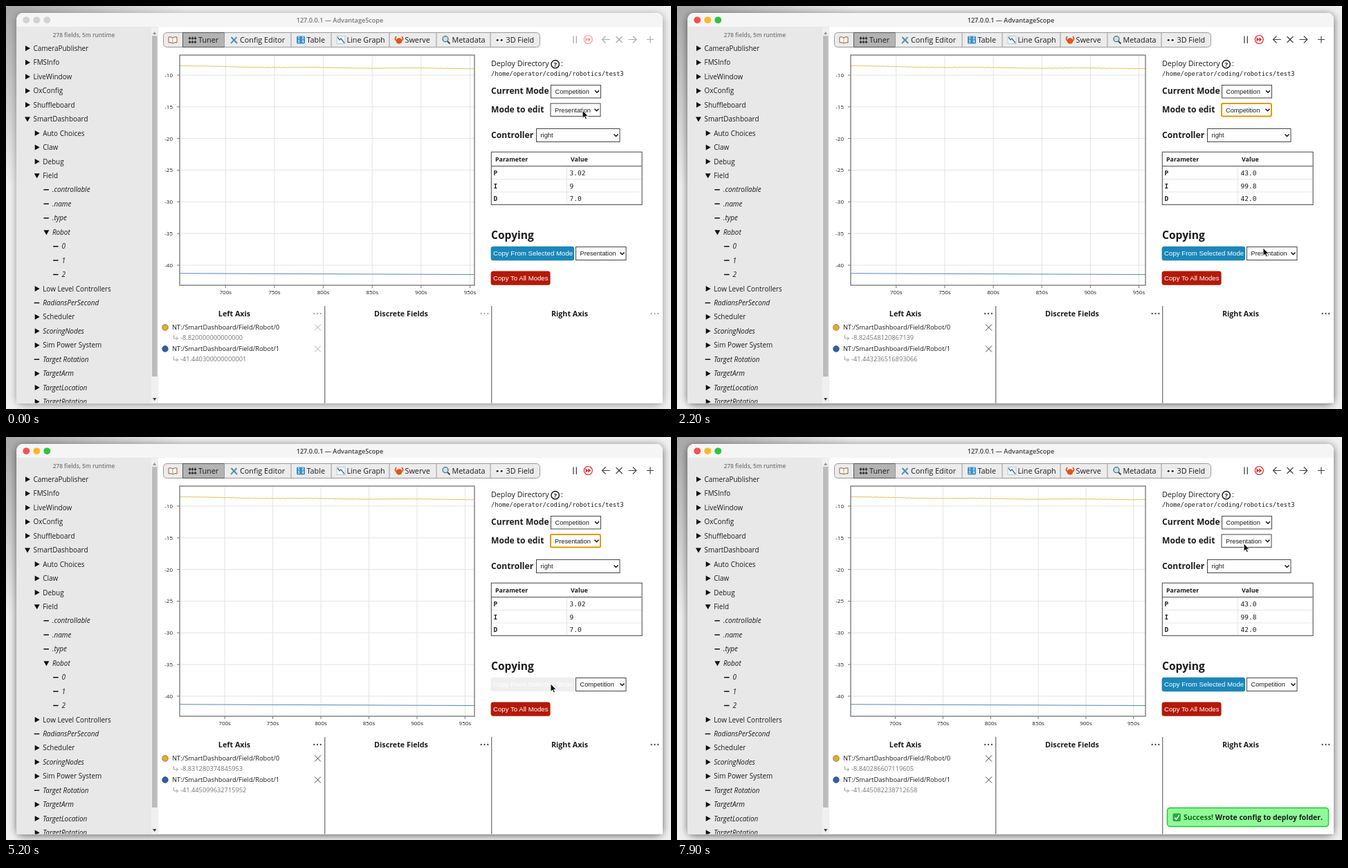
These frames come from a looping animation (961 px wide and 583 px high, 8 s). An HTML page:

```html
<!DOCTYPE html>
<html lang="en">
<head>
<meta charset="utf-8">
<title>Tuner</title>
<style>
html, body { margin: 0; width: 100%; height: 100%; overflow: hidden; background: #efefef; }
svg { display: block; width: 961px; height: 583px; }
text { font-family: "Open Sans", "Noto Sans", sans-serif; fill: #1c1c1c; white-space: pre; }
.mono { font-family: "DejaVu Sans Mono", monospace; }
.ui { font-family: "Liberation Sans", Arial, sans-serif; }
.b { font-weight: 700; }
.sb { font-weight: 600; }
.i { font-style: italic; }
</style>
</head>
<body>
<svg id="stage" viewBox="0 0 961 583" xmlns="http://www.w3.org/2000/svg"></svg>
<script>
const LOOP = 8000, STEP = 100;
const stage = document.getElementById('stage');

// Moments of the story, in ms
const AT = {
  focus: 400, editOpen: 500, editPick: 1300, copyFocus: 2400, copyOpen: 3100, copyPick: 3600,
  editReopen: 3900, editRepick: 4400, copyClick: 5100, ask: 5500, confirm: 6500, written: 6800, toast: 7000
};

// Where the pointer comes to rest
const STOPS = [
  { at: AT.focus, x: 833, y: 151 },
  { at: 1100, x: 828, y: 177 },
  { at: 1500, x: 828, y: 178 },
  { at: 2200, x: 847, y: 350 },
  { at: AT.copyOpen, x: 847, y: 354 },
  { at: AT.copyPick, x: 846, y: 386 },
  { at: AT.editReopen, x: 815, y: 158 },
  { at: 4100, x: 809, y: 174 },
  { at: AT.editRepick, x: 811, y: 164 },
  { at: 4900, x: 787, y: 357 },
  { at: AT.ask, x: 787, y: 357 },
  { at: 6000, x: 616, y: 219 },
  { at: 6200, x: 592, y: 247 },
  { at: 7100, x: 590, y: 249 },
  { at: 7500, x: 841, y: 160 },
  { at: 7900, x: 819, y: 154 }
];

// Markup helpers
const rect = (x, y, w, h, fill, more = '') =>
  `<rect x="${x}" y="${y}" width="${w}" height="${h}" fill="${fill}" ${more}/>`;
const circle = (x, y, r, fill, more = '') => `<circle cx="${x}" cy="${y}" r="${r}" fill="${fill}" ${more}/>`;
const path = (d, more = '') => `<path d="${d}" ${more}/>`;
const stroke = (d, color, width = 1, more = '') =>
  path(d, `fill="none" stroke="${color}" stroke-width="${width}" ${more}`);
const text = (x, y, size, str, cls = '', more = '') =>
  `<text x="${x}" y="${y}" font-size="${size}" class="${cls}" ${more}>${str}</text>`;
const group = (id, body) => `<g id="${id}">${body}</g>`;
const repeat = (n, make) => Array.from({ length: n }, (_, i) => make(i)).join('');
const mid = 'text-anchor="middle"';
const white = 'style="fill:#fff"';

// Sidebar rows: level, marker (> closed, v open, - leaf), label; * means italic
const TREE = `0>CameraPublisher 0>FMSInfo 0>LiveWindow 0>OxConfig 0>Shuffleboard 0vSmartDashboard
1>Auto_Choices 1>Claw 1>Debug 1vField 2-*.controllable 2-*.name 2-*.type 2v*Robot 3-*0 3-*1 3-*2
1>Low_Level_Controllers 1-*RadiansPerSecond 1>Scheduler 1>*ScoringNodes 1>Sim_Power_System
1-*Target_Rotation 1>*TargetArm 1>*TargetLocation 1>*TargetRotation`.split(/\s+/);
const MARKS = { '>': 'M-3 -4L4 0L-3 4Z', 'v': 'M-4 -3H4L0 4Z', '-': 'M-4 -.7h7.5v1.5h-7.5Z' };

function sidebar() {
  const rows = TREE.map((row, i) => {
    const y = 61.3 + 20.45 * i, x = 31 + 13.7 * row[0];
    const label = row.slice(2).replace('*', '').replace(/_/g, ' ');
    return path(MARKS[row[1]], `transform="translate(${x} ${y})" fill="#111"`) +
      text(x + 8.5, y + 3.6, 9.95, label, row[2] === '*' ? 'i' : '');
  }).join('');
  return rect(15, 30, 205, 545, '#e8e8e8') +
    text(112.5, 44.7, 8.3, '278 fields, 5m runtime', 'sb', mid + ' style="fill:#777"') + rows +
    rect(210, 31, 9.5, 544, '#f0f0f0') + rect(211, 43, 7.5, 493, '#bcbcbc') +
    path('M212 41h5.4l-2.7 -4Z', 'fill="#999"') + path('M212 567h5.4l-2.7 4Z', 'fill="#444"');
}

// Small pictograms around 0,0
const ICON = {
  book: path('M-6 -4Q-3 -5 0 -3Q3 -5 6 -4V4Q3 3 0 5Q-3 3 -6 4Z', 'fill="#fff" stroke="#a5522f"') + stroke('M0 -3V4', '#999'),
  sliders: repeat(3, i => stroke(`M${4 * i - 4} -5V5`, '#555', .8) +
    rect(4 * i - 5.6, -3.5, 3.2, 2.4, '#333') + rect(4 * i - 5.6, 2, 3.2, 2.4, '#333')),
  tools: stroke('M-4.5 5L4 -4', '#7c8b94', 2) + stroke('M4.5 5L-4 -4', '#3b92c4', 2),
  digits: rect(-6, -5.5, 12, 11, '#3d91c9', 'rx="1.5"') +
    repeat(4, i => text(i % 2 * 6 - 3, i < 2 ? -.7 : 4.3, 5, i + 1, 'b', `${mid} ${white}`)),
  graph: rect(-6, -5.5, 12, 11, '#f4f7f8', 'stroke="#b9cdd6"') + stroke('M-5 -4L-2 0L0 -2L5 4.5', '#2f78b7', 1.4),
  crab: circle(0, 1.5, 4.3, '#e2541b') + stroke('M-4 1Q-7 -1 -4 -5M4 1Q7 -1 4 -5', '#e2541b', 1.8),
  lens: circle(-1, -1.3, 4, '#c5e3f2', 'stroke="#5a6a72" stroke-width="1.3"') + stroke('M2 2L5.5 5.5', '#444', 2),
  eyes: repeat(2, i => circle(6 * i - 3, 0, 3, '#fff') + circle(6 * i - 3.8, .3, 1.6, '#333'))
};
const TABS = [['book', '', 28.5], ['sliders', 'Tuner', 60], ['tools', 'Config Editor', 96.5], ['digits', 'Table', 58],
  ['graph', 'Line Graph', 84], ['crab', 'Swerve', 68], ['lens', 'Metadata', 78], ['eyes', '3D Field', 71.5]];

function tabs() {
  let x = 227;
  const cells = TABS.map(([icon, label, w]) => {
    const chosen = label === 'Tuner';
    const cell = (chosen ? rect(x, 38.5, w, 21, '#b3b3b3') : '') +
      (label ? stroke(`M${x} 38.5v21` + (chosen ? `h${w}v-21Z` : ''), chosen ? '#555' : '#999') : '') +
      `<g transform="translate(${x + 14} 49)">${ICON[icon]}</g>` + text(x + 22.5, 52.8, 10.8, label);
    x += w;
    return cell;
  }).join('');
  return rect(227.5, 38.5, 544, 21, '#ececec', 'rx="5" stroke="#999"') + cells;
}

const cross = (x, y, r) => `M${x - r} ${y - r}l${2 * r} ${2 * r}m0 ${-2 * r}l${-2 * r} ${2 * r}`;
const arrow = (x, dir) => `M${x - 5.7 * dir} 48.5h${11.4 * dir}m${-5 * dir} -5l${5 * dir} 5l${-5 * dir} 5`;

const toolbar = () =>
  stroke('M820 43.5v10.5m4.3 0v-10.5', '#444', 1.3) +
  circle(841.3, 48.5, 6, 'none', 'stroke="#f02020" stroke-width="1.2"') +
  path('M837.5 45.5l3.8 3l-3.8 3Zm3.8 0l3.8 3l-3.8 3Z', 'fill="#f02020"') +
  stroke(arrow(867.2, -1) + cross(886, 48.5, 4.5) + arrow(905.2, 1) + 'M926 48.5h10m-5 -5v10', '#444', 1.2) +
  repeat(9, i => circle([450, 691.5, 937.5][i % 3] + 4.8 * (Math.floor(i / 3) - 1), 445, 1.15, '#444')) +
  stroke(cross(450.5, 465, 4.5) + cross(450.5, 496, 4.5), '#444');

const fields = () =>
  text(330, 448.5, 10.75, 'Left Axis', 'b', mid) + text(571, 448.5, 10.75, 'Discrete Fields', 'b', mid) +
  text(814.5, 448.5, 10.75, 'Right Axis', 'b', mid) +
  repeat(2, i => {
    const y = 465 + 31 * i;
    return circle(230, y, 4.4, ['#e3ae24', '#2a62ab'][i], 'stroke="#0006" stroke-width=".9"') +
      text(240, y + 3.4, 9.4, 'NT:/SmartDashboard/Field/Robot/' + i) +
      stroke(`M242.5 ${y + 11}v5h6m-2.6 -2.5l2.6 2.5l-2.6 2.5`, '#888', .8) +
      text(252, y + 18.4, 9.25, '', '', `id="value${i}" style="fill:#757575"`);
  }) + stroke('M460.7 434v141M701.7 434v141', '#777', 1.3);

const select = (id, x, y, w, h, label) =>
  rect(x + .5, y + .5, w - 1, h - 1, '#fff', `stroke="#444" id="${id}Box"`) +
  text(x + 6.5, y + h / 2 + 3.3, 9.25, label, 'ui', `id="${id}"`) +
  stroke(`M${x + w - 9} ${y + h / 2 - 1.5}l3 3l3 -3`, '#111', 1.5);

const MODES = ['Presentation', 'Competition', 'Testing', 'Simulation'];
const ITEM = 11.4;
const popup = (id, x, y) => group(id, rect(x + .5, y + .5, 71.5, 46.5, '#fff', 'stroke="#555"') +
  repeat(MODES.length, i => rect(x + 1, y + 1 + ITEM * i, 70.5, ITEM, '#1e90ff', 'class="hot"') +
    text(x + 6.5, y + 9.7 + ITEM * i, 9.25, MODES[i], 'ui')));

const table = () =>
  stroke('M702 250.5h217M702 269h217M810.5 232v55', '#e6e6e6') +
  rect(701.3, 211.2, 217.8, 76.2, 'none', 'stroke="#444"') + stroke('M701.5 231.7h217', '#444') +
  text(707, 225, 8.9, 'Parameter', 'b') + text(816, 225, 8.9, 'Value', 'b') +
  repeat(3, i => text(704.5, 245 + 18.5 * i, 9.5, 'PID'[i], 'mono b') +
    text(814.5, 245 + 18.5 * i, 9.5, '', 'mono', `id="gain${i}"`));

const panel = () =>
  text(701, 87, 10.75, 'Deploy Directory') + circle(793.7, 84.2, 5.7, '#fff', 'stroke="#111" stroke-width="1.4"') +
  text(793.7, 87.7, 9.5, '?', 'b', mid) + text(802, 87, 10.75, ':') +
  text(701, 101, 8.86, '/home/operator/coding/robotics/test3', 'mono') +
  text(701, 127, 12.1, 'Current Mode', 'b') + select('current', 787, 114, 73, 19.5, MODES[1]) +
  text(701, 153.5, 12.1, 'Mode to edit', 'b') + select('edit', 786.5, 140.5, 73, 19.5, '') +
  text(701, 190.5, 12.1, 'Controller', 'b') + select('ctrl', 766, 177, 121.5, 20, 'right') + table() +
  text(701, 337, 15.6, 'Copying', 'b') +
  rect(700.6, 347.8, 120.6, 20.4, '', 'rx="3.5" id="copyBtn"') +
  text(704, 361.4, 9.7, 'Copy From Selected Mode', 'ui', white) + select('copy', 823, 348, 73.5, 20, '') +
  rect(700.6, 383.6, 86, 20.2, '#b3190a', 'rx="3.5"') + text(704, 397.2, 9.65, 'Copy To All Modes', 'ui', white);

const NOTICE = ['This action will overwrite all data for the selected edit mode on the selected',
  'controller, replacing it with the data for the currently selected copy mode. This', 'action is irreversible.'];

const modal = () => group('modal',
  rect(272.3, 163, 420.5, 104.3, '#f6f6f6', 'rx="8" style="filter:drop-shadow(0 3px 6px #000a)"') +
  path('M272.3 185V171q0 -8 8 -8H684.8q8 0 8 8V185Z', 'fill="#ececec"') +
  circle(286, 174, 4.9, '#f3564f') + text(482.5, 177.2, 8.8, 'Copy To One Mode', 'sb', mid) +
  rect(297, 188.5, 31.5, 32.5, '#1530d8') +
  repeat(3, i => text(349, 197.3 + 10.8 * i, 8.76, NOTICE[i])) +
  rect(485, 242, 201.5, 19.5, '#cfcfcf', 'rx="4"') +
  text(379, 255, 8.9, 'Cancel', '', mid) + text(585.5, 255, 8.9, 'Confirm', '', mid));

const toast = () => group('toast',
  rect(708.5, 536.5, 233, 27, '#90fa98', 'rx="4" stroke="#21c52f" stroke-width="1.4"') +
  rect(716.5, 544.5, 11.5, 11.5, '#2aa83a', 'rx="2"') + stroke('M719 550.5l2.5 2.8l4.2 -6', '#fff', 1.6) +
  text(732, 553.7, 10.5, '<tspan fill="#116d17">Success!</tspan> Wrote config to deploy folder.', 'b'));

// Chart: the left edge is fixed while the visible span grows
const CHART = { x: 251, y: 71, w: 426, h: 333, start: 653.1, span: 301.5 };

const levels = () => repeat(7, i => {
  const y = 100 + 45.83 * i;
  return stroke(`M251 ${y}h426`, '#e4e4e4') + stroke(`M247 ${y}h4`, '#777') +
    text(241, y + 2.9, 8, -10 - 5 * i, '', 'text-anchor="end"');
});

const yellowAt = s => 86.4 + 4.6 * s / (s + 120) + s / 500 + .35 * Math.sin(s / 17 + 3) +
  .25 * Math.sin(s * 1.1) + .15 * Math.sin(s * 2.3);

stage.innerHTML =
  `<defs><clipPath id="win">${rect(15.5, 10, 933.5, 580, '#fff', 'rx="9"')}</clipPath>
  <radialGradient id="desk" gradientUnits="userSpaceOnUse" cx="0" cy="0" r="260">
  <stop stop-color="#a8a8a8"/><stop offset="1" stop-color="#f0f0f0"/></radialGradient></defs>` +
  rect(0, 0, 961, 583, 'url(#desk)') + rect(15.5, 10, 933.5, 564.5, '#fff', 'rx="9" id="shadow"') +
  '<g clip-path="url(#win)"><svg width="961" height="574.5" overflow="hidden">' +
  rect(15, 10, 935, 565, '#fff') + rect(15, 10, 935, 20.5, '#f5f5f5') +
  repeat(3, i => circle(29.3 + 15 * i, 20.3, 4.9, '', 'class="light"')) +
  text(482.5, 24, 9.15, '127.0.0.1 — AdvantageScope', 'sb', mid + ' id="title"') +
  sidebar() + tabs() + group('tools', toolbar()) + fields() + panel() + levels() + group('plot', '') +
  rect(CHART.x, CHART.y, CHART.w, CHART.h, 'none', 'stroke="#7d7d7d" stroke-width="1.4"') + '</svg></g>' +
  popup('editPopup', 786.5, 160) + popup('copyPopup', 823, 368) + toast() + modal() +
  group('cursor', path('M0 0V11.5L2.7 9L4.5 13L6.5 12.2L4.7 8.3H8.3Z',
    'fill="#111" stroke="#fff" stroke-width=".9" stroke-linejoin="round"'));

const el = {};
stage.querySelectorAll('[id]').forEach(node => el[node.id] = node);
const lights = stage.querySelectorAll('.light');

function pointer(t) {
  const next = STOPS.findIndex(s => s.at > t);
  if (next <= 0) return next ? STOPS[STOPS.length - 1] : STOPS[0];
  const a = STOPS[next - 1], b = STOPS[next];
  const u = (t - a.at) / (b.at - a.at), ease = u * u * (3 - 2 * u);
  return { x: a.x + (b.x - a.x) * ease, y: a.y + (b.y - a.y) * ease };
}

function drawPlot(t) {
  const span = CHART.span + t / 1000, xOf = s => CHART.x + CHART.w * s / span;
  const times = repeat(6, i => {
    const sec = 700 + 50 * i, x = xOf(sec - CHART.start);
    return stroke(`M${x} 71v333`, '#e4e4e4') + stroke(`M${x} 404v4`, '#777') + text(x, 416.6, 8, sec + 's', '', mid);
  });
  const line = repeat(Math.floor(span) + 1, s => `${s ? 'L' : 'M'}${xOf(s).toFixed(2)} ${yellowAt(s).toFixed(2)}`);
  el.plot.innerHTML = times + stroke(line, '#e2bb45') + stroke('M251 386.8L677 388.5', '#5485bd');
}

function drawReadings(t) {
  const sway = Math.sin(t * 1.7);
  el.value0.textContent = (-8.835 + .022 * sway + .015 * Math.cos(t / 900)).toFixed(15);
  el.value1.textContent = (-41.4453 + .005 * Math.exp(-t / 2000) + .0004 * sway).toFixed(15);
}

const show = (node, on) => { node.style.display = on ? '' : 'none'; };

function ring(box, on) {
  box.setAttribute('stroke', on ? '#e59700' : '#444');
  box.setAttribute('stroke-width', on ? 2 : 1);
  box.setAttribute('rx', on ? 2 : 0);
}

function drawPopup(node, open, top, y) {
  show(node, open);
  const hot = Math.max(0, Math.min(MODES.length - 1, Math.floor((y - top - 1) / ITEM)));
  node.querySelectorAll('.hot').forEach((bar, i) => {
    show(bar, i === hot);
    bar.nextSibling.style.fill = i === hot ? '#fff' : '#1c1c1c';
  });
}

function draw(t) {
  const between = (from, to) => t >= AT[from] && t < AT[to];
  const { x, y } = pointer(t);
  const asking = between('ask', 'confirm'), active = t >= AT.focus && !asking;
  el.cursor.setAttribute('transform', `translate(${x} ${y})`);
  el.tools.style.opacity = active ? 1 : .45;
  el.title.style.fill = active ? '#3d3d3d' : '#777';
  el.shadow.style.filter = `drop-shadow(0 2px 6px ${active ? '#0009' : '#0006'})`;
  lights.forEach((c, i) => c.setAttribute('fill', active ? ['#fb4f49', '#fdb824', '#2bc53d'][i] : '#d2d2d2'));

  const editing = between('editPick', 'editRepick');
  el.edit.textContent = MODES[+editing];
  el.copy.textContent = MODES[+(t >= AT.copyPick)];
  ring(el.editBox, between('editPick', 'copyFocus') || between('editRepick', 'ask'));
  ring(el.copyBox, between('copyFocus', 'copyOpen'));
  drawPopup(el.editPopup, between('editOpen', 'editPick') || between('editReopen', 'editRepick'), 160, y);
  drawPopup(el.copyPopup, between('copyOpen', 'copyPick'), 368, y);

  const gains = editing || t >= AT.written ? ['43.0', '99.8', '42.0'] : ['3.02', '9', '7.0'];
  gains.forEach((g, i) => el['gain' + i].textContent = g);
  el.copyBtn.setAttribute('fill', between('copyClick', 'written') ? '#efefef' : '#1b87b9');
  show(el.modal, asking);
  show(el.toast, t >= AT.toast);
  drawPlot(t);
  drawReadings(t);
}

let shown = -1;
function tick() {
  const t = Math.floor(performance.now() % LOOP / STEP) * STEP;
  if (t !== shown) draw(shown = t);
  requestAnimationFrame(tick);
}
tick();
</script>
</body>
</html>
```
